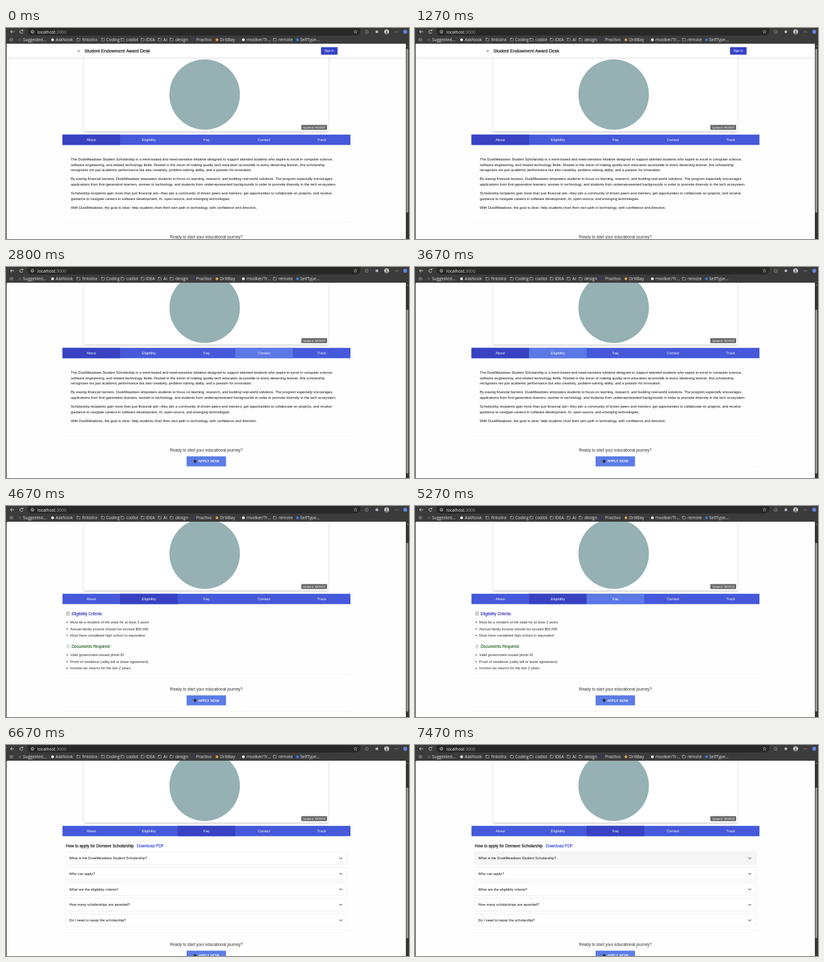
An HTML page with a canvas for the animation above (8 s loop, 640 px wide and 336 px high).

```html
<!DOCTYPE html>
<html lang="en">
<head>
<meta charset="utf-8">
<title>Scholarship page</title>
<style>
html, body { margin: 0; width: 640px; height: 336px; overflow: hidden; background: #fefefe; }
canvas { display: block; }
</style>
</head>
<body>
<canvas id="stage" width="640" height="336"></canvas>
<script>
const ctx = document.getElementById('stage').getContext('2d');
const LOOP = 8000;
const SANS = '"Liberation Sans", Arial, sans-serif';
const UI = '"Open Sans", "Noto Sans", sans-serif';
const TXT = 5.714;
const BAR = [69, 89, 218], ACTIVE = [56, 66, 194], HOVER = [91, 121, 230];
const TABS = ['About', 'Eligibility', 'Faq', 'Contact', 'Track'];

const ABOUT = [
  [209, 'The DuskMeadows Student Scholarship is a merit-based and need-sensitive initiative designed to support talented students who aspire to excel in computer science,'],
  [217.6, 'software engineering, and related technology fields. Rooted in the vision of making quality tech education accessible to every deserving learner, this scholarship'],
  [226.1, 'recognizes not just academic performance but also creativity, problem-solving ability, and a passion for innovation.'],
  [240.4, 'By easing financial barriers, DuskMeadows empowers students to focus on learning, research, and building real-world solutions. The program especially encourages'],
  [249, 'applications from first-generation learners, women in technology, and students from underrepresented backgrounds in order to promote diversity in the tech ecosystem.'],
  [263.2, 'Scholarship recipients gain more than just financial aid\u2014they join a community of driven peers and mentors, get opportunities to collaborate on projects, and receive'],
  [271.8, 'guidance to navigate careers in software development, AI, open-source, and emerging technologies.'],
  [286, 'With DuskMeadows, the goal is clear: help students chart their own path in technology, with confidence and direction.']
];
const CRITERIA = ['Must be a resident of the state for at least 2 years',
  'Annual family income should not exceed $50,000',
  'Must have completed high school or equivalent'];
const DOCUMENTS = ['Valid government-issued photo ID',
  'Proof of residence (utility bill or lease agreement)',
  'Income tax returns for the last 2 years'];
const QUESTIONS = ['What is the DuskMeadows Student Scholarship?', 'Who can apply?',
  'What are the eligibility criteria?', 'How many scholarships are awarded?',
  'Do I need to repay the scholarship?'];

// label x, icon x, icon colour, label; no colour means a folder
const BOOKMARKS = [
  [27, 22, '#555', 'Suggested...'], [79, 74, '#eee', 'AskNook'], [121, 115, '', 'fintolira'],
  [159, 154, '', 'Coding'], [191, 185, '', 'codlot'], [222, 217, '', 'IDEA'],
  [250, 244, '', 'Ai'], [269, 263, '', 'design'], [302, 297, '#3b3560', 'Practivo'],
  [340, 335, '#d9a04a', 'DrillBay'], [382, 377, '#eee', 'mvolker/Tr...'],
  [433, 427, '', 'remote'], [467, 463, '#3d7be0', 'SelfType...']
];

function rect(x, y, w, h, fill, r = 0, line) {
  ctx.beginPath();
  ctx.roundRect(x, y, w, h, r);
  if (fill) { ctx.fillStyle = fill; ctx.fill(); }
  if (line) { ctx.strokeStyle = line; ctx.lineWidth = 0.5; ctx.stroke(); }
}
function disc(x, y, r, fill) {
  ctx.beginPath();
  ctx.arc(x, y, r, 0, 7);
  ctx.fillStyle = fill;
  ctx.fill();
}
function line(points, color, width = 0.9) {
  ctx.beginPath();
  points.forEach(([x, y]) => ctx.lineTo(x, y));
  ctx.strokeStyle = color;
  ctx.lineWidth = width;
  ctx.stroke();
}
function ring(x, y, r, color, from = 0, to = 7) {
  ctx.beginPath();
  ctx.arc(x, y, r, from, to);
  ctx.strokeStyle = color;
  ctx.lineWidth = 0.9;
  ctx.stroke();
}
// y is the middle of the capitals
function text(s, x, y, { size = TXT, color = '#0c0c0c', font = SANS, align = 'left', heavy = 0 } = {}) {
  ctx.font = `${size}px ${font}`;
  ctx.textAlign = align;
  ctx.fillStyle = color;
  ctx.fillText(s, x, y + size * 0.35);
  if (heavy) {
    ctx.strokeStyle = color;
    ctx.lineWidth = heavy;
    ctx.lineJoin = 'round';
    ctx.strokeText(s, x, y + size * 0.35);
  }
}
function shadowed(blur, dy, draw) {
  ctx.save();
  ctx.shadowColor = 'rgba(0,0,0,.2)';
  ctx.shadowBlur = blur;
  ctx.shadowOffsetY = dy;
  draw();
  ctx.restore();
}

const ramp = (t, a, b) => {
  const k = Math.min(1, Math.max(0, (t - a) / (b - a)));
  return k * k * (3 - 2 * k);
};
const pulse = (t, a, b, c, d) => ramp(t, a, b) - ramp(t, c, d);
const mix = (a, b, k) => a.map((v, i) => v + (b[i] - v) * k);

function scrollAt(t) {
  if (t < 1930) return 0;
  if (t < 2000) return 20;
  return t >= 3930 && t < 5670 ? 30 : 41;
}
function tabStates(t) {
  const toElig = ramp(t, 3930, 4130), toFaq = ramp(t, 5670, 5930);
  return {
    active: [1 - toElig, toElig - toFaq, toFaq, 0, 0],
    hover: [0,
      pulse(t, 3200, 3400, 4800, 5000),
      pulse(t, 2870, 3000, 3200, 3400) + pulse(t, 4800, 5100, 6600, 6700),
      pulse(t, 2270, 2470, 2870, 3000), 0]
  };
}

function drawBrowser() {
  rect(0, 0, 640, 336, '#3b3b3b');
  rect(34, -4, 529, 16, '#282828', 7);
  const ink = '#d5d5d5';
  line([[13, 6], [7, 6]], ink);
  line([[9.5, 3.5], [7, 6], [9.5, 8.5]], ink);
  ring(24.5, 6, 2.5, ink, 0.4, 5.6);
  line([[25, 4.6], [27, 4.6], [27, 2.6]], ink);
  ring(42, 6, 2.2, ink);
  line([[42, 5.6], [42, 7.4]], ink, 0.7);
  const url = { font: UI, size: 6.8, color: '#f0f0f0' };
  text('localhost', 50, 6.2, url);
  text(':3000', 50 + ctx.measureText('localhost').width, 6.2, { ...url, color: '#a0a0a0' });
  const star = [];
  for (let i = 0; i <= 10; i++) {
    const a = i * Math.PI / 5 - Math.PI / 2, r = i % 2 ? 1.3 : 2.9;
    star.push([555 + r * Math.cos(a), 6 + r * Math.sin(a)]);
  }
  line(star, '#b5b5b5', 0.6);
  rect(570.8, 4, 4.2, 4.2, null, 1, ink);
  disc(589, 6, 2.3, '#a9b5b5');
  disc(604.5, 6, 3.8, '#d8d8d8');
  disc(604.5, 5, 1.3, '#555');
  rect(602.3, 7, 4.4, 1.8, '#555', 0.9);
  for (const x of [617.8, 620, 622.2]) disc(x, 6, 0.6, ink);
  disc(634, 6, 3.2, '#5f83d6');

  rect(6, 16.6, 5, 4, null, 1.5, ink);
  line([[7, 18.6], [10, 18.6]], ink, 0.6);
  for (const [x, ix, color, label] of BOOKMARKS) {
    if (color) disc(ix, 18.7, 2.2, color);
    else {
      rect(ix - 2.5, 16.8, 5, 4, null, 0.6, ink);
      rect(ix - 2.5, 16.3, 2.2, 0.9, ink);
    }
    text(label, x, 18.5, { font: UI, size: 6.6, color: '#e3e3e3' });
  }
}

function drawTop() {
  shadowed(3, 1, () => rect(124, 40, 388, 124.6, '#fff'));
  disc(315.5, 106, 56, '#95b1b3');
  rect(469, 154.2, 41, 8, '#6d6d6d', 1);
  text('Updated: 9/6/2025', 489.5, 158.2, { size: 4.286, color: '#fff', align: 'center' });

  shadowed(2, 0.5, () => rect(1, 25, 634, 22.5, '#fff'));
  disc(115.5, 36.8, 1.8, '#a9b4b5');
  text('Student Endowment Award Desk', 124.5, 36.6, { size: 7.143, color: '#111', heavy: 0.2 });
  rect(500.3, 30.5, 26.3, 12, '#3542c8', 1);
  text('Sign in', 513.2, 36.6, { size: 5, color: '#fff', align: 'center' });
}

function drawTabs(t) {
  const { active, hover } = tabStates(t), left = 89.7, w = 457.3 / 5;
  rect(left, 169.8, w * 5, 16.4, `rgb(${BAR})`);
  TABS.forEach((label, i) => {
    if (active[i] || hover[i]) {
      const c = mix(mix(BAR, HOVER, hover[i]), ACTIVE, active[i]);
      rect(left + i * w, 169.8, w, 16.4, `rgb(${c.map(Math.round)})`);
    }
    text(label, left + (i + 0.5) * w, 178, { color: '#fff', align: 'center' });
  });
}

function drawAbout() {
  ABOUT.forEach(([y, s]) => text(s, 103, y));
}

function sheet(x, y, board) {
  rect(x - 2.4, y - 2.8, 4.8, 5.8, board, 0.6);
  rect(x - 1.8, y - 2, 3.6, 4.4, '#f4f6f8');
  for (let i = 0; i < 3; i++) line([[x - 1.2, y - 1 + i * 1.3], [x + 1.2, y - 1 + i * 1.3]], '#8a9aa6', 0.4);
}
function bulletList(items, y) {
  items.forEach((s, i) => {
    disc(97.2, y + i * 10.65, 0.9, '#333');
    text(s, 102, y + i * 10.65, { color: '#2a2a2a' });
  });
}
function drawEligibility() {
  sheet(98.6, 201.3, '#8d7468');
  text('Eligibility Criteria:', 104.2, 201.3, { size: 6.43, color: '#2a2cb2', heavy: 0.14 });
  bulletList(CRITERIA, 215);
  sheet(98.6, 253.4, '#c9d3da');
  text('Documents Required:', 104.2, 253.4, { size: 6.43, color: '#245f24', heavy: 0.14 });
  bulletList(DOCUMENTS, 267.2);
}

function drawFaq(t) {
  text('How to apply for Dornave Scholarship', 95, 201.3, { size: 6.43, color: '#111', heavy: 0.18 });
  text('Download PDF', 207.5, 201.3, { size: 6.43, color: '#2136d6', heavy: 0.1 });
  QUESTIONS.forEach((q, i) => {
    const y = 221.2 + i * 24.7;
    rect(95, y - 10, 446.5, 20, i === 0 && t >= 7070 ? '#f6f6f6' : '#fff', 1, '#dedede');
    text(q, 100.5, y);
    line([[529.4, y - 1], [531.6, y + 1.2], [533.8, y - 1]], '#222', 1);
  });
}

function drawApply(y) {
  rect(90, y - 23.5, 457, 0.6, '#f0f0f0');
  text('Ready to start your educational journey?', 318.2, y, { size: 6.43, color: '#333', align: 'center' });
  rect(286.8, y + 10, 62.6, 16, '#5c7ce6', 0.5);
  const cy = y + 18;
  ctx.beginPath();
  [[296.8, cy - 0.8], [300.2, cy - 2.6], [303.6, cy - 0.8], [300.2, cy + 1]].forEach(p => ctx.lineTo(...p));
  ctx.fillStyle = '#2b2f36';
  ctx.fill();
  rect(298.3, cy, 3.8, 2.2, '#2b2f36', 0.8);
  line([[297.6, cy - 0.6], [297.6, cy + 2.2]], '#d9a441', 0.6);
  text('APPLY NOW', 305.2, cy, { color: '#fff', heavy: 0.15 });
  rect(90, y + 34.5, 457, 0.6, '#f0f0f0');
}

function drawScrollbar(scroll, length) {
  rect(635, 25, 5, 311, '#353535');
  line([[636, 30], [637.5, 28], [639, 30]], '#999', 0.7);
  rect(635.8, 33 + scroll * 0.85, 3, length, '#9c9c9c', 1.5);
}

function draw(t) {
  const scroll = scrollAt(t);
  const page = t < 3930 ? 0 : t < 5670 ? 1 : 2;
  drawBrowser();
  ctx.save();
  ctx.beginPath();
  ctx.roundRect(1, 25, 634, 312, [2, 0, 0, 0]);
  ctx.clip();
  rect(0, 25, 640, 311, '#fefefe');
  ctx.translate(0, -scroll);
  drawTop();
  drawTabs(t);
  [drawAbout, drawEligibility, drawFaq][page](t);
  drawApply([332.5, 321.6, 358.5][page]);
  ctx.restore();
  drawScrollbar(scroll, [261, 269, 240][page]);
}

function tick(now) {
  draw(now % LOOP);
  requestAnimationFrame(tick);
}
draw(0);
requestAnimationFrame(tick);
</script>
</body>
</html>
```
